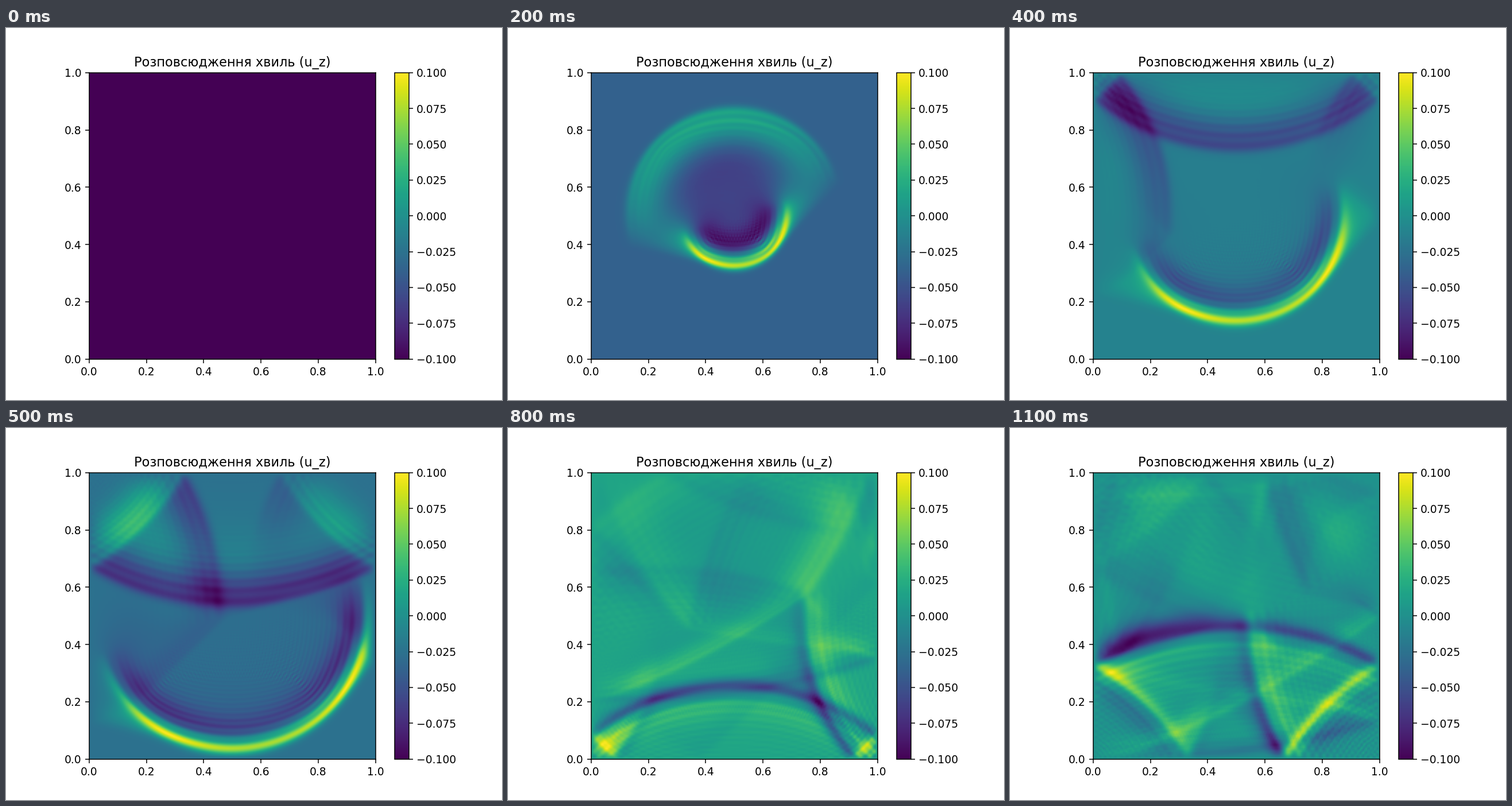
Animation of 864 by 648 pixels, one loop 1.2 s. Source, as a matplotlib script:

```python
import numpy as np
import matplotlib.pyplot as plt
from matplotlib.animation import FuncAnimation
from matplotlib.cm import ScalarMappable
from matplotlib.colors import Normalize

N = 201
DX = 1 / (N - 1)
DT = 0.00125
STEPS = 800
EVERY = 79
FREQ = 5.0
FAST, SLOW = 2.0, 1.0


def ricker(t):
    a = (np.pi * FREQ * t) ** 2
    return (1 - 2 * a) * np.exp(-a)


def simulate():
    """Wave equation over a tilted interface, fixed walls, point source."""
    x, y = np.meshgrid(np.linspace(0, 1, N), np.linspace(0, 1, N))
    speed = np.where(y > 0.35 + 0.3 * x, FAST, SLOW)
    k = (speed[1:-1, 1:-1] * DT / DX) ** 2
    mid = N // 2
    prev, u = np.zeros((N, N)), np.zeros((N, N))
    shots = [u.copy()]
    for n in range(STEPS):
        lap = (u[2:, 1:-1] + u[:-2, 1:-1] + u[1:-1, 2:] + u[1:-1, :-2]
               - 4 * u[1:-1, 1:-1])
        new = np.zeros((N, N))
        new[1:-1, 1:-1] = 2 * u[1:-1, 1:-1] - prev[1:-1, 1:-1] + k * lap
        new[mid, mid] += DT ** 2 / DX ** 2 * ricker(n * DT)
        prev, u = u, new
        if (n + 1) % EVERY == 0 or n + 1 == STEPS:
            shots.append(u.copy())
    return shots


shots = simulate()

fig, ax = plt.subplots(figsize=(6.4, 4.8), dpi=135)
im = ax.imshow(shots[0], cmap="viridis", origin="lower", extent=[0, 1, 0, 1])
ax.set_title("Розповсюдження хвиль (u_z)")
fig.colorbar(ScalarMappable(Normalize(-0.1, 0.1), "viridis"), ax=ax)


def update(i):
    u = shots[i]
    im.set_data(u)
    im.set_clim(u.min(), u.max())  # every shot uses its own full colour range
    return [im]


anim = FuncAnimation(fig, update, frames=len(shots), interval=100,
                     repeat=True, repeat_delay=0)
plt.show()
```
